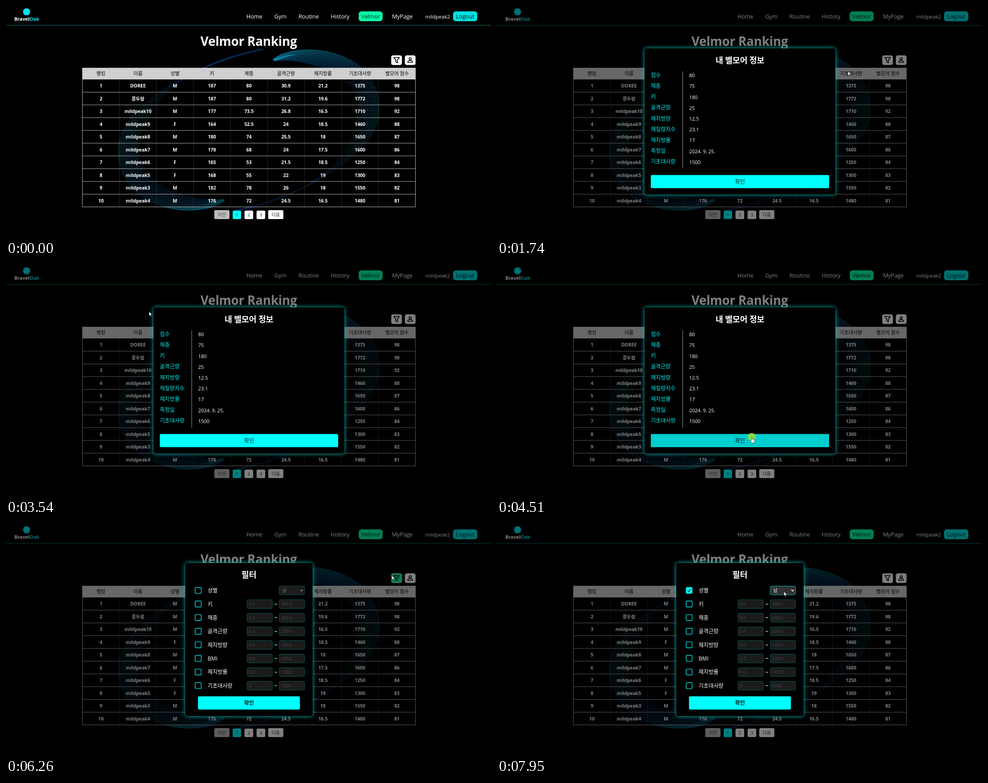
Recreate the animation shown at these times as an HTML page. Size 1085 px wide and 516 px high, loop 8 s.

```html
<!DOCTYPE html>
<html lang="ko">
<head>
<meta charset="utf-8">
<title>Velmor Ranking</title>
<style>
  html, body { margin: 0; width: 100%; height: 100%; overflow: hidden; background: #000; }
  svg { display: block; width: 100%; height: 100%; }
  text { font-family: "Open Sans", "Noto Sans CJK KR", "Noto Sans CJK", sans-serif; letter-spacing: -.01em; }
  .card { filter: drop-shadow(0 0 5px #00c4c4); }
</style>
</head>
<body>
<svg id="stage" viewBox="0 0 1085 516"></svg>
<script>
const LOOP = 8000;
const CYAN = '#00ffff', GREEN = '#00ffaa';

// ---- drawing helpers ----
const rect = (x, y, w, h, fill, rx = 0, extra = '') =>
  `<rect x="${x}" y="${y}" width="${w}" height="${h}" rx="${rx}" fill="${fill}" ${extra}/>`;
const line = (x1, y1, x2, y2, color, extra = '') =>
  `<path d="M${x1} ${y1}L${x2} ${y2}" stroke="${color}" ${extra}/>`;
// cy is the optical middle of the line of text
const text = (x, cy, str, size, fill = '#fff', weight = 400, anchor = 'middle', extra = '') =>
  `<text x="${x}" y="${cy + size * .36}" font-size="${size}" fill="${fill}" font-weight="${weight}" text-anchor="${anchor}" ${extra}>${str}</text>`;
const repeat = (n, fn) => Array.from({ length: n }, (_, i) => fn(i)).join('');

// ---- background ribbon: one bundle of strands and its half-turn copy ----
function ribbon() {
  const strands = 36;
  const bundle = repeat(strands, i => {
    const u = i / (strands - 1);
    const x = 836 - 46 * u, y = 232 - 8 * u;
    // strands spread at the bend and gather again in the tail
    const d = `M${597 + 4 * u} ${119 + 4 * u}C${650 - 8 * u} ${75 + 40 * u} ${x + 2 * u} ${90 + 50 * u} ${x} ${y}` +
      `C${x} ${y + 88} ${692 + 14 * u} ${418 + 6 * u} 511 ${456 + 3 * u}`;
    const alpha = (.14 + .5 * Math.sin(i * 2.3) ** 2) * (1 - .4 * u);
    return `<path d="${d}" stroke-opacity="${alpha.toFixed(2)}"/>`;
  });
  return `<defs>
    <linearGradient id="strand" gradientUnits="userSpaceOnUse" x1="640" y1="90" x2="600" y2="460">
      <stop offset="0" stop-color="#0aa3b4"/><stop offset=".1" stop-color="#0b66b8"/>
      <stop offset=".34" stop-color="#0a9298"/><stop offset=".55" stop-color="#08707c" stop-opacity=".8"/>
      <stop offset=".75" stop-color="#0a4a90" stop-opacity=".4"/><stop offset="1" stop-color="#0a4490" stop-opacity=".25"/>
    </linearGradient>
    <g id="bundle"><path d="M597 119C650 75 836 90 836 232Q826 300 790 335Q800 290 790 224C770 140 642 115 597 119Z" fill="#06304f" fill-opacity=".2"/>
      <g fill="none" stroke="url(#strand)">${bundle}</g>
      <path d="M596 120Q622 108 652 108Q626 113 602 123Z" fill="#0b98a2" opacity=".7"/></g>
  </defs><use href="#bundle"/><use href="#bundle" transform="rotate(180 543 277)"/>`;
}

function header() {
  const links = [[555.5, 'Home'], [614, 'Gym'], [677, 'Routine'], [747.5, 'History'], [886.5, 'MyPage']];
  return rect(0, 0, 1085, 43, '#000') + rect(0, 42.5, 1085, 1.5, '#02544f') +
    '<circle cx="46" cy="13" r="8" fill="#00e0ea"/>' +
    text(46.5, 29.5, 'Bravel<tspan fill="#00e0ea">Oak</tspan>', 11, '#fff', 700) +
    links.map(([x, s]) => text(x, 23.5, s, 12.8, '#fff', 500)).join('') +
    rect(789, 12, 53.5, 22, GREEN, 6) + text(815.7, 23.5, 'Velmor', 12.8, '#022', 500) +
    text(965.5, 24, 'mildpeak2', 11.6, '#fff', 500) +
    rect(1000, 12, 54.5, 22, '#00dfdf', 6) + text(1027.2, 23.5, 'Logout', 12.8, '#022', 500);
}

function table() {
  const left = 171, top = 164, width = 745, pitch = 28.48, col = width / 9;
  const bottom = top + pitch * 10;
  const heads = '랭킹,이름,성별,키,체중,골격근량,체지방률,기초대사량,벨모어 점수'.split(',');
  const rows = `DOREE M 187 80 30.9 21.2 1375 98
콩두람 M 187 80 31.2 19.6 1772 98
mildpeak10 M 177 73.5 26.8 16.5 1710 92
mildpeak9 F 164 52.5 24 18.5 1460 88
mildpeak8 M 180 74 25.5 18 1650 87
mildpeak7 M 178 68 24 17.5 1600 86
mildpeak6 F 165 53 21.5 18.5 1250 84
mildpeak5 F 168 55 22 19 1300 83
mildpeak3 M 182 78 26 18 1550 82
mildpeak4 M 176 72 24.5 16.5 1480 81`.split('\n');
  const mid = c => left + col * (c + .5);
  return rect(left, top, width, bottom - top, '#000', 0, 'opacity=".5"') +
    rect(left, 138.5, width, 25.5, '#cfcfcf') +
    heads.map((s, c) => text(mid(c), 151.3, s, 11, '#000', 500)).join('') +
    repeat(8, c => line(left + col * (c + 1), top, left + col * (c + 1), bottom, '#4c4c4c', 'stroke-dasharray="2 1.4" stroke-width=".9"')) +
    repeat(9, r => line(left, top + pitch * (r + 1), left + width, top + pitch * (r + 1), '#c4c4c4', 'stroke-width=".9"')) +
    rect(left, 138.5, width, bottom - 138.5, 'none', 0, 'stroke="#d4d4d4" stroke-width=".9"') +
    rows.map((row, r) => `${r + 1} ${row}`.split(' ')
      .map((s, c) => text(mid(c), top + pitch * (r + .5) + .4, s, 10.6, '#fff', 700)).join('')).join('');
}

function pager() {
  const items = [[466, 34, '이전', '#bcbcbc', '#444'], [507, 19, '1', CYAN, '#033'],
    [533.5, 19.5, '2', '#fff', '#222'], [560.5, 19.5, '3', '#fff', '#222'], [586.5, 34, '다음', '#fff', '#333']];
  return items.map(([x, w, s, bg, fg]) => rect(x, w > 30 ? 456 : 457, w, w > 30 ? 20 : 19, bg, 3) +
    text(x + w / 2, 466.5, s, 9.8, fg)).join('');
}

const icons = () =>
  rect(862.2, 110.8, 23, 20.4, '#fff', 3.5, 'id="filterBtn" stroke="#fff"') +
  rect(892.8, 110.8, 23, 20.4, '#fff', 3.5, 'id="userBtn" stroke="#fff"') +
  `<g fill="none" stroke="#000" stroke-width="1.7" stroke-linejoin="round">
    <path d="M867.5 115H880L875.6 120.6V127L872 124.8V120.6Z"/>
    <circle cx="904.2" cy="118" r="2.5"/>
    <path d="M898.9 126V124.8C898.9 122.8 902 122 904.2 122S909.5 122.8 909.5 124.8V126Z"/></g>`;

const shade = () => rect(0, 0, 1085, 516, '#000', 0, 'opacity=".5"');

function infoCard() {
  const items = [['점수', '80'], ['체중', '75'], ['키', '180'], ['골격근량', '25'], ['체지방량', '12.5'],
    ['체질량지수', '23.1'], ['체지방률', '17'], ['측정일', '2024. 9. 25.'], ['기초대사량', '1500']];
  return shade() + rect(330, 94.5, 427, 326.5, '#000', 5, 'class="card"') +
    text(543.5, 121, '내 벨모어 정보', 18.3, '#fff', 700) +
    items.map(([k, v], i) => text(344, 154.5 + 24.2 * i, k, 12.2, '#00eeee', 400, 'start') +
      text(430, 155.2 + 24.2 * i, v, 11.2, '#fff', 500, 'start')).join('') +
    line(415.5, 146, 415.5, 363, '#999') +
    rect(344, 377.5, 399, 29.5, CYAN, 3, 'id="okBtn"') + text(543.5, 392.7, '확인', 12.2, '#022');
}

function filterCard() {
  const items = [['성별'], ['키', '0.0', '300.0'], ['체중', '0.0', '200.0'], ['골격근량', '0.0', '200.0'],
    ['체지방량', '0.0', '100.0'], ['BMI', '0.0', '100.0'], ['체지방률', '0.0', '100.0'], ['기초대사량', '0', '5000']];
  const field = (x, cy, s) => rect(x, cy - 9.7, 56.5, 19.4, '#1b1b1b', 3, 'stroke="#075c5c"') +
    text(x + 4, cy, s, 9.8, '#484848', 400, 'start');
  return shade() + rect(401, 87, 285, 342, '#000', 5, 'class="card"') +
    text(543.5, 113.5, '필터', 18.3, '#fff', 700) +
    items.map(([name, lo, hi], i) => {
      const cy = 148.4 + 30.36 * i;
      return rect(423.2, cy - 6.7, 13.4, 13.4, '#000', 2, `stroke="#00e4e4" stroke-width="1.4" ${i ? '' : 'id="box"'}`) +
        text(451, cy + .4, name, 12.2, '#fff', 500, 'start') +
        (lo ? field(539.2, cy + .2, lo) + text(603.5, cy + .8, '~', 12, '#fff', 600) + field(611.3, cy + .2, hi) : '');
    }).join('') +
    rect(611.3, 138.7, 56.5, 19.4, '#1d1d1d', 3, 'id="pick" stroke="#075c5c"') +
    text(618, 148, '남', 10.2, '#888', 400, 'start', 'id="pickText"') +
    '<path id="pickArrow" d="M658.5 147L661.2 149.8L663.9 147" fill="none" stroke="#888" stroke-width="1.5"/>' +
    '<path id="tick" d="M426.8 148.6L429.2 151.6L433.4 144.8" fill="none" stroke="#022" stroke-width="1.4"/>' +
    rect(429.5, 385, 228, 29.5, CYAN, 3) + text(543.5, 400, '확인', 12.2, '#022', 700);
}

const pointer = () => `<g id="cursor" stroke="#000" stroke-width=".7" stroke-linejoin="round" fill="#fff">
    <circle id="ring" r="9" fill="#b4e61e" fill-opacity=".72" stroke="none"/>
    <path id="arrow" d="M0 0V9.6L2.2 7.7L3.7 11L5.3 10.3L3.8 7.1H6.8Z"/>
    <path id="hand" d="M-1.2 1.2A1.2 1.2 0 0 1 1.2 1.2V5L5.4 6.1Q6.7 6.6 6.5 8L5.5 13.4H-.3L-3.3 8.9Q-3.3 7 -1.2 8.6Z"/></g>`;

document.getElementById('stage').innerHTML = ribbon() + header() +
  text(543, 78.5, 'Velmor Ranking', 27.8, '#fff', 700) + icons() + table() + pager() +
  `<g id="info">${infoCard()}</g><g id="filter">${filterCard()}</g>` + pointer();

// ---- motion ----
const el = id => document.getElementById(id);
const show = (id, on) => el(id).setAttribute('visibility', on ? 'inherit' : 'hidden');
const paint = (id, attrs) => { for (const k in attrs) el(id).setAttribute(k, attrs[k]); };
const between = (t, a, b) => t >= a && t < b;

// time, x, y of the pointer tip
const path = [
  [430, 1019, 464], [1150, 912, 123], [1570, 912, 123], [2040, 490, 198], [2450, 422, 290],
  [2860, 485, 373], [3080, 450, 392], [3380, 242, 240], [3540, 320, 104], [3680, 360, 206],
  [4370, 570, 384], [4780, 570, 384], [5650, 843, 127], [5860, 868, 119], [6130, 868, 119],
  [6260, 863, 115], [6460, 856, 118], [7280, 433.5, 147.5], [7480, 433.5, 147.5], [7950, 642, 151]
];
const clicks = [[1500, 1570], [4510, 4570], [6060, 6130], [7410, 7480]];

function tipAt(t) {
  const i = path.findIndex(k => k[0] > t);
  if (i < 1) return path[i < 0 ? path.length - 1 : 0].slice(1);
  const [t0, x0, y0] = path[i - 1], [t1, x1, y1] = path[i];
  const p = (t - t0) / (t1 - t0), e = p * p * (3 - 2 * p);
  return [x0 + (x1 - x0) * e, y0 + (y1 - y0) * e];
}

function render(t) {
  const [x, y] = tipAt(t);
  const over = (l, top, r, b) => x > l && x < r && y > top && y < b;
  const info = between(t, 1570, 4570), filter = t >= 6130, open = info || filter;
  const onUser = !open && over(892, 110, 917, 132);
  const onFilter = !open && over(861, 110, 887, 132);
  const onOk = info && over(344, 377, 743, 407);
  const checked = t >= 7480;

  show('info', info);
  show('filter', filter);
  // hover colour lingers briefly after a card opens
  paint('userBtn', { fill: onUser || between(t, 1570, 1690) ? GREEN : '#fff' });
  paint('filterBtn', { fill: onFilter || between(t, 6130, 6330) ? GREEN : '#fff' });
  paint('okBtn', { fill: onOk ? '#00cece' : CYAN });

  paint('box', { fill: checked ? CYAN : '#000' });
  paint('pick', { fill: checked ? '#333' : '#1d1d1d', stroke: checked ? '#00b4b4' : '#075c5c' });
  paint('pickText', { fill: checked ? '#fff' : '#888' });
  paint('pickArrow', { stroke: checked ? '#fff' : '#888' });
  el('tick').setAttribute('opacity', checked ? 1 : 0);

  const hand = onUser || onFilter || onOk;
  show('cursor', t >= 430);
  show('hand', hand);
  show('arrow', !hand);
  show('ring', clicks.some(([a, b]) => between(t, a, b)));
  // 'inherit' keeps the parts hidden together with the pointer group
  paint('cursor', { transform: `translate(${x.toFixed(1)} ${y.toFixed(1)})` });
}

function tick() {
  render(performance.now() % LOOP);
  requestAnimationFrame(tick);
}
tick();
</script>
</body>
</html>
```
